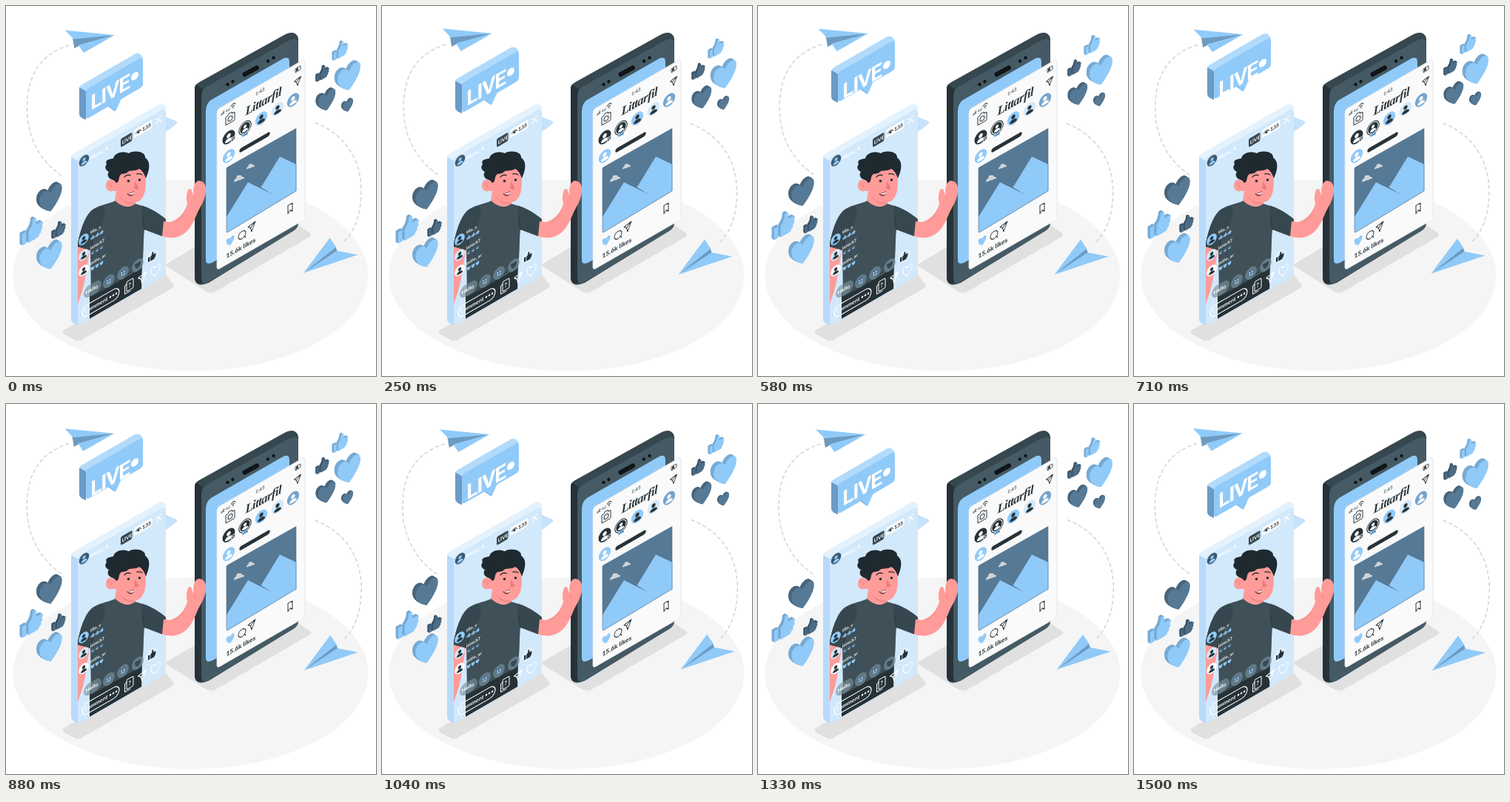
Write an HTML page that moves like this. It is 500 px wide and 500 px high and loops after 1540 ms.

```html
<!DOCTYPE html>
<html lang="en">
<head>
<meta charset="utf-8">
<title>Live stream</title>
<style>
html, body { margin: 0; width: 100%; height: 100%; overflow: hidden; background: #fff; }
svg { display: block; width: 100vw; height: 100vh; }
text { font-family: Lato, "Open Sans", sans-serif; font-weight: 700; }
.title { font-family: "Liberation Serif", serif; font-style: italic; letter-spacing: -.5px; }
.thin { font-weight: 400; }
.live { font-family: Roboto, sans-serif; letter-spacing: -1.2px; }
</style>
</head>
<body>
<svg id="stage" viewBox="0 0 500 500"></svg>
<script>
const LOOP = 1540, SLOPE = -0.577;
const BLUE = '#90caf9', STEEL = '#567995', MID = '#6d9ac0', PALE = '#d2e8fb', INK = '#263238', SLATE = '#37474f';
const SKIN = '#ff9b99', BLUSH = '#ee8a89', WHITE = '#fff';
const stage = document.getElementById('stage');

const path = (d, fill, extra = '') => `<path d="${d}" fill="${fill}" ${extra}/>`;
const line = (d, color, w = 1, extra = '') =>
  `<path d="${d}" fill="none" stroke="${color}" stroke-width="${w}" stroke-linecap="round" stroke-linejoin="round" ${extra}/>`;
const dot = (x, y, r, fill, extra = '') => `<circle cx="${x}" cy="${y}" r="${r}" fill="${fill}" ${extra}/>`;
const box = (x, y, w, h, r, fill, extra = '') =>
  `<rect x="${x}" y="${y}" width="${w}" height="${h}" rx="${r}" fill="${fill}" ${extra}/>`;
const label = (x, y, size, fill, str, cls = '') =>
  `<text x="${x}" y="${y}" font-size="${size}" fill="${fill}" class="${cls}">${str}</text>`;
const group = (id, body) => `<g id="${id}">${body}</g>`;
const iso = (x, y, body, s = 1) => `<g transform="matrix(${s},${SLOPE * s},0,${s},${x},${y})">${body}</g>`;
const at = (x, y, s, body) => `<g transform="translate(${x} ${y}) scale(${s})">${body}</g>`;

const HEART = 'M0 14C-8 8-13 1-12-6C-11-13-3-13 0-6C3-13 11-13 12-6C13 1 8 8 0 14Z';
const HAND = 'M-4-1C0-4 1-8 1-12C4-15 7-11 5-4H11C14-4 14 0 12 1C14 3 13 5 11 6C12 8 11 10 9 10C9 13 7 13 5 13H-4Z';
const CUFF = 'M-12-2H-6V12H-12Z';
const PLANE = 'M-5-3L5-5L0 6L-1.5 0ZM-1.5 0L5-5';

// Extruded shape: side copies first, then the front face
function solid(x, y, s, shapes, front, side, depth) {
  let out = '';
  for (const d of shapes) {
    for (let i = depth; i > 0; i -= 0.5) out += iso(x - i, y + i * SLOPE, path(d, side), s);
    out += iso(x, y, path(d, front), s);
  }
  return out;
}
const heart = (x, y, s, dark) => solid(x, y, s, [HEART], dark ? STEEL : BLUE, dark ? '#48657c' : '#78aad3', s * 3.5);
const thumb = (x, y, s, dark) => solid(x, y, s, [CUFF, HAND], dark ? '#4d6c86' : BLUE, dark ? '#3a5266' : '#78aad3', s * 3);

const person = (x, y, r, bg, fg) => dot(x, y, r, bg) + at(x, y, r / 8,
  dot(0, -2, 2.6, fg) + path('M-4.8 5C-5 0 5 0 4.8 5Q0 7-4.8 5Z', fg));

function bigPhone() {
  const shell = path('M255 111Q255 106 261 103L378 38Q392 32 395 44V292Q395 300 388 304L274 374Q255 382 255 366Z', SLATE)
    + path('M255 111L257 106L266 113V374Q255 378 255 366Z', INK)
    + path('M264 121Q264 113 271 109L382 47Q395 40 395 52V293Q395 300 388 304L276 372Q264 379 264 368Z', '#455a64')
    + path('M270 142Q270 132 277 127L371 73Q383 65 383 76V282L282 345Q270 352 270 343Z', BLUE)
    + line('M322.500 92.500L339 83.500', '#0f1518', 6)
    + [[299.500, 106], [306.500, 102], [354, 74.500], [361.500, 70]].map(p => dot(p[0], p[1], 2.2, '#0f1518')).join('');

  const status = [0, 1, 2, 3].map(i => box(5 + i * 1.3, 10 - i * 1.1, 0.8, 1.2 + i * 1.1, 0, INK)).join('')
    + label(11.5, 11, 5, INK, '4G', 'thin')
    + line('M19 6.500Q22 3 25 6.500M20.500 8.300Q22 6.800 23.500 8.300', INK, 0.9) + dot(22, 10, 0.8, INK)
    + label(52, 11.5, 6.3, INK, '1:43', 'thin')
    + box(106, 6, 7, 5, 1, 'none', `stroke="${INK}" stroke-width=".8"`) + box(107, 7, 3, 3, 0, INK);

  const camera = line('M13 17H15L16 15H20L21 17H23Q24 17 24 18V27Q24 28 23 28H13Q12 28 12 27V18Q12 17 13 17Z', INK, 1)
    + dot(18, 22.5, 3, 'none', `stroke="${INK}"`);
  const title = label(38.5, 30.5, 16.5, INK, 'Littarfil', 'title');
  const send = (x, y, c, s = 1) => at(x, y, s, line(PLANE, c, 1));

  const stories = person(16, 46.5, 8.5, INK, WHITE) + dot(22, 52, 2.8, SLATE, 'stroke="#fff" stroke-width=".7"')
    + line('M20.700 52H23.300M22 50.700V53.300', WHITE, 0.6)
    + dot(38, 46.5, 8.2, WHITE, `stroke="${INK}" stroke-width="1"`) + person(38, 46.5, 6.7, INK, WHITE)
    + box(34, 53, 8, 4.5, 1, BLUE) + label(35, 56.5, 3.2, INK, 'LIVE')
    + person(60, 46.5, 8.2, BLUE, INK) + person(82, 46.5, 8.2, PALE, INK) + person(103, 46.5, 8.2, '#74a5ce', WHITE)
    + person(16, 72, 8.2, BLUE, WHITE) + line('M33 73.500H69', INK, 5.5);

  const tools = at(18, 187.5, 0.45, path(HEART, BLUE))
    + dot(34, 189, 5, 'none', `stroke="${INK}"`) + line('M37 192L39 195', INK)
    + send(47, 186, INK) + line('M96 185H102V196L99 193L96 196Z', INK)
    + label(12.5, 208.5, 8.4, INK, '15.6k likes');

  const panel = iso(285, 140, box(0, 0, 119, 217, 4, '#fafafa', 'stroke="#dfe3e6" stroke-width=".8"')
    + status + camera + title + send(109, 25, INK, 0.9) + stories + tools);

  const cloud = (x, y, s) => at(x, y, s, path('M-7 6Q-7 2-4 1Q-3-5 1-3Q4-4 4-1Q7-2 7 1Z', '#cfd5da'));
  const frame = 'M299 218L392 165.500V250L299 306Q298 306 298 304V220Z';
  const photo = path(frame, STEEL)
    + path('M298 285L327 238L344 246L370 203.500L392.500 214V250L299 306H298Z', BLUE)
    + path('M327 238L360 254.500L343 244Z', STEEL)
    + line(frame, '#4b6c86', 0.6)
    + cloud(315, 232, 1) + cloud(330.5, 216, 0.8);
  return shell + panel + photo;
}

function man() {
  const body = path('M96 324L113 328Q109 360 104 382L96 406Z', SKIN)
    + path('M113 386L184 347L183 386L113 428Z', INK)
    + path('M148 263C138 268 123 269 115 277C104 288 99 310 96 325L114 330L115 393L183 355C187 335 185 320 187 302L211 311L217 289C208 281 195 273 184 270L174 267Z', '#3f5058')
    + path('M115 277C104 288 99 310 96 325L114 330Q119 312 130 295Q136 280 132 271Q121 272 115 277Z', SLATE)
    + path('M187 302L211 311L217 289C208 281 195 273 184 270Q181 286 187 302Z', SLATE)
    + line('M187 302L185 286M114 330L118 312', INK, 0.8)
    + path('M149 250L175 258V267Q163 277 147 263Z', SKIN)
    + path('M152 255Q162 266 174 265V267Q160 270 152 255Z', BLUSH);
  const arm = path('M213 291L222 292C235 288 241 278 245 268C243 258 244 249 248 247C252 247 251 253 254 256C252 247 254 237 261 236C269 237 271 244 270 252C269 262 262 272 258 281C254 291 249 302 240 308C230 315 220 314 211 311Z', SKIN)
    + line('M254 256Q254 262 257 265M225 293Q233 291 239 283', BLUSH, 0.9);
  const head = path('M149 225C151 214 186 212 188 226C190 240 189 255 182 262C174 269 158 265 151 254Z', SKIN)
    + `<ellipse cx="141.500" cy="242.500" rx="6.500" ry="8" fill="${SKIN}"/>` + path('M145 234H153V250H145Z', SKIN)
    + line('M138 240Q142 239 143 245', '#e97f80', 1)
    + path('M136 214C133 207 141 207 145 206C147 197 160 196 166 199C174 194 189 197 188 205C196 210 194 222 189 233C187 227 184 222 180 220C174 224 166 221 164 225C160 228 157 225 154 229C152 233 153 238 149 239Q146 235 144 235C138 233 136 228 139 224C134 222 133 217 136 214Z', '#1f2a30')
    + dot(165.5, 236.5, 1.8, INK) + dot(180.5, 235, 1.8, INK)
    + line('M160 231Q164 227 168 229M177 227Q181 226 184 228', INK, 1.4)
    + path('M174 237L180 246Q177 249 173 247Z', '#ee7d7f')
    + path('M163 253Q168 254 173 250Q173 256 169 257Q165 257 163 253Z', '#8c3b44')
    + path('M164 253.300Q168 254.500 173 251L172 254Q168 256 164 253.300Z', WHITE);
  return `<clipPath id="face"><path d="M97 206L216 137V363L97 432Z"/></clipPath><g clip-path="url(#face)">${body}</g>` + arm + head;
}

function smallPhone() {
  return path('M212 148L231 156Q232 158 230 160L212 173Z', '#c6e2fb')
    + path('M88 205Q88 201 92 199L207 133Q211 131 214 134L217 138L97 210V432L91 428Q88 426 88 423Z', '#e3f2fd')
    + path('M88 204L97 209V432L91 428Q88 426 88 423Z', '#b8dbfa')
    + iso(97, 206, box(0, 0, 119, 227, 5, PALE));
}

function chat() {
  const bar = person(8.5, 7.7, 6.8, '#3d5a73', BLUE)
    + label(17, 12, 7.2, WHITE, 'Mirel_K')
    + box(58, 7, 15.5, 11.5, 2, SLATE) + label(59.7, 15.5, 6.6, WHITE, 'LIVE')
    + box(76.5, 5.5, 24, 11, 2, WHITE) + line('M78.500 11.500Q82 7 85.500 11.500', INK, 1) + dot(82, 12, 1.6, INK)
    + label(87, 14, 7, INK, '135')
    + line('M105.500 7.500L112.500 14.500M112.500 7.500L105.500 14.500', WHITE, 1.3);

  const marks = [
    x => at(x, 0, 0.2, path(HAND + CUFF, BLUE)),
    x => dot(x, 0, 2.3, STEEL) + line(`M${x - 1} .6Q${x} 1.800 ${x + 1} .6`, WHITE, 0.5),
    x => at(x, 0, 0.2, path(HEART, BLUE))
  ];
  const rows = ['tilo_v', 'juna.b7', 'ostin_ar'].map((name, i) => {
    const y = 114 + i * 21;
    return person(8, y, 6.8, [BLUE, PALE, WHITE][i], INK) + label(17, y - 2, 5.8, WHITE, name)
      + [20, 26, 32].map(x => `<g transform="translate(0 ${y + 4})">${marks[i](x)}</g>`).join('');
  }).join('');

  const smile = (x, y) => dot(x, y, 8, '#78909c', 'opacity=".65"') + dot(x, y, 5, STEEL)
    + dot(x - 1.7, y - 1, 0.8, WHITE) + dot(x + 1.7, y - 1, 0.8, WHITE)
    + line(`M${x - 2.3} ${y + 1.5}Q${x} ${y + 4} ${x + 2.3} ${y + 1.5}`, WHITE, 0.8);
  const quick = box(8, 180, 24, 16, 8, '#78909c', 'opacity=".65"') + label(10.5, 190.5, 7.2, WHITE, 'Hello')
    + smile(42, 190) + smile(61, 190)
    + dot(81, 191, 8, '#78909c', 'opacity=".65"') + at(81, 191, 0.33, path(HEART, SLATE))
    + dot(100, 190, 8, '#e3f2fd', 'opacity=".7"') + at(100, 190, 0.42, path(HAND + CUFF, INK));

  const input = box(6, 205, 50, 15, 7.5, 'none', 'stroke="#fff" stroke-width="1.200"')
    + label(9, 215, 7.2, WHITE, 'Comment')
    + [44, 48, 52].map(x => dot(x, 212.5, 1.3, WHITE)).join('')
    + box(66, 205, 9, 13, 1.5, 'none', 'stroke="#fff" stroke-width="1"') + line('M66 208L63.500 209V220H71', WHITE, 1)
    + label(68.3, 214.5, 8, WHITE, '?')
    + at(87, 212, 1.1, line(PLANE, WHITE, 1.1)) + at(105, 211.5, 0.52, line(HEART, WHITE, 2));
  return iso(97, 206, bar + rows + quick + input);
}

function bubble() {
  return path('M99 112Q99 108 103 106L174 65Q179 63 182 66L185 70L109 118Z', '#b1dafb')
    + path('M99 110L108 115V154L102 151Q99 149 99 146Z', '#6b9bc4')
    + path('M136 134L141 133L148 142L146 141.500Z', '#6b9bc4')
    + iso(108, 113, box(0, 0, 77, 40.5, 4, BLUE))
    + path('M139 135L156 125L148.500 141.500Q147 143 146 141Z', BLUE);
}

const trail = d => line(d, '#d6d6d6', 1.6, 'stroke-dasharray="4 4.500"');

stage.innerHTML = `<ellipse cx="249.500" cy="364" rx="240" ry="129.500" fill="#f5f5f5"/>`
  + path('M78 438L214 361L226 376Q228 379 225 381L102 451Q97 454 92 451L79 444Q75 441 78 438Z', '#e0e0e0')
  + path('M214 350L262 322L392 294L411 307Q413 310 410 312L283 386Q277 389 271 386Z', '#e0e0e0')
  + group('trailL', trail('M85 53C54 63 28 85 28.500 140C29 178 46 209 75 229'))
  + group('trailR', trail('M418 158C455 172 480 205 480 250C480 280 472 303 457 318'))
  + bigPhone() + smallPhone() + man() + chat()
  + group('reacts',
      heart(60.5, 260, 1.25, true) + thumb(35, 303, 1.1) + thumb(71.5, 302, 0.68, true) + heart(60.5, 338, 1.25)
      + thumb(452, 59.5, 0.77) + thumb(428, 90.5, 0.65, true) + heart(463.5, 96, 1.27)
      + heart(433.5, 127.5, 0.97, true) + heart(462, 134.5, 0.58, true))
  + group('bubble', bubble())
  + group('live', iso(108, 113, label(6.3, 32, 28, WHITE, 'LIVE', 'live') + dot(66, 20, 5, WHITE)))
  + group('planeL',
      path('M90 42L147 39L100 53L92.500 57Z', MID) + path('M80 32.500L147 39L91.500 44.500Z', BLUE)
      + path('M147 39L105 63L98 52.500Z', BLUE))
  + group('planeR',
      path('M445 325L448 333L402 361Z', MID) + path('M437.500 313.500L446 326L402 361Z', BLUE)
      + path('M447 331L475 336.500L402 361Z', BLUE));

function move(id, x, y) {
  document.getElementById(id).setAttribute('transform', `translate(${x.toFixed(2)} ${y.toFixed(2)})`);
}

function render(ms) {
  const t = ms % LOOP;
  // Rise and fall: half eased, half linear
  const p = ((t + 30) % LOOP) / LOOP;
  const lift = ((1 - Math.cos(p * 2 * Math.PI)) / 2 + 1 - Math.abs(1 - 2 * p)) / 2;
  move('bubble', 0, 0.5 - 28 * lift);
  move('live', 0, 0.3 - 18.5 * lift);
  move('reacts', 0, 0.2 - 9 * lift);

  const sway = Math.sin((t - 20) / LOOP * 2 * Math.PI);
  move('planeL', 2 * sway, -2.4 * sway);
  move('planeR', -2 * sway, 2.5 * sway);
  move('trailL', 0.8 * sway, -1.2 * sway);
  move('trailR', -0.5 * sway, 1.6 * sway);
}

const start = performance.now();
function tick() {
  render(performance.now() - start);
  requestAnimationFrame(tick);
}
render(0);
tick();
</script>
</body>
</html>
```
